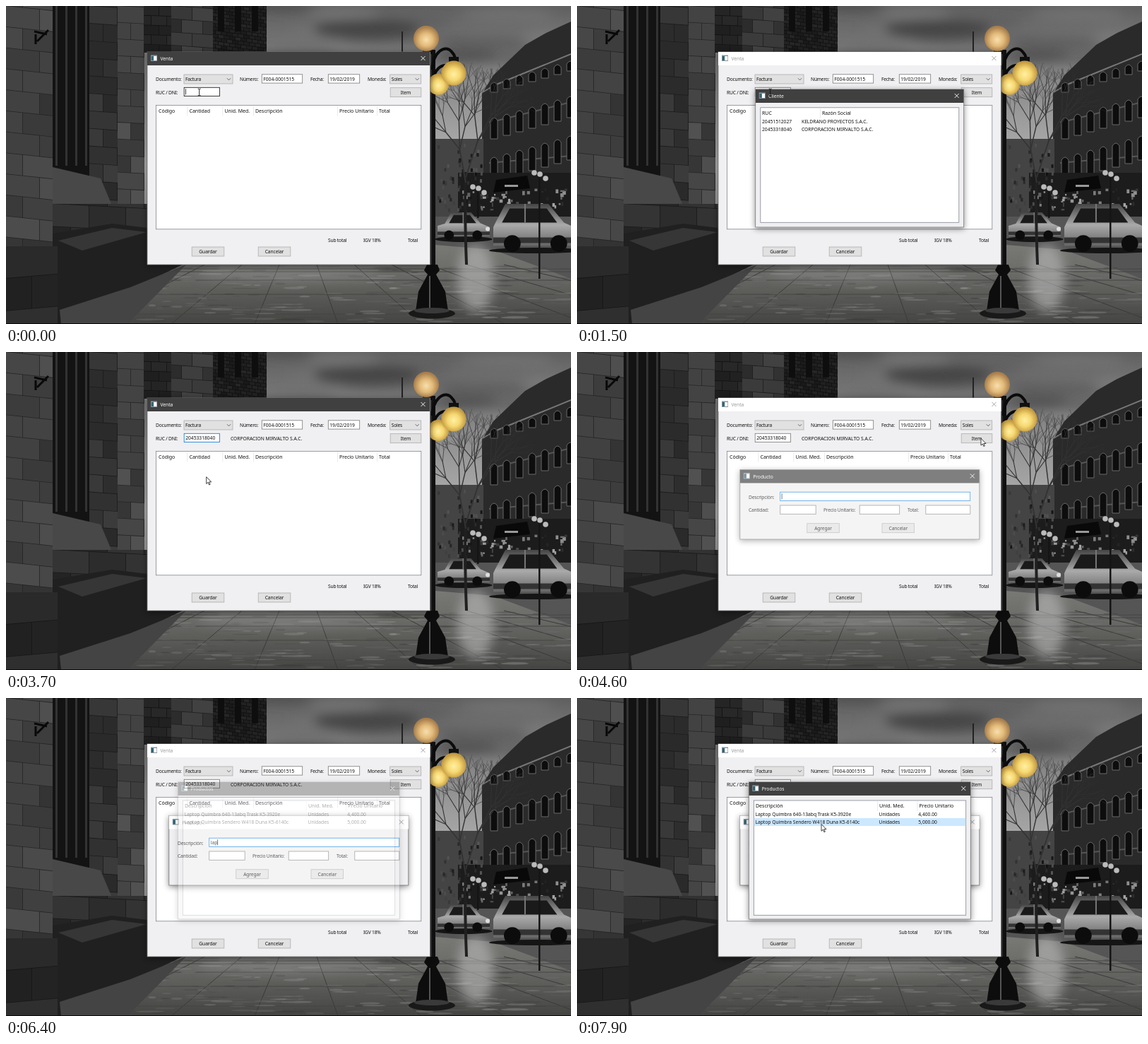
Recreate the animation shown at these times as an HTML page. Size 800 px wide and 450 px high, loop 8000 ms.

```html
<!DOCTYPE html>
<html lang="es">
<head>
<meta charset="utf-8">
<title>Venta</title>
<style>
  html, body { margin: 0; width: 100%; height: 100%; overflow: hidden; background: #222; }
  svg { display: block; }
  #stage { width: 100vw; height: 100vh; }
  text { font-family: "Noto Sans", "Open Sans", sans-serif; white-space: pre; }
  .window { filter: drop-shadow(0 2px 4px rgba(0, 0, 0, .45)); }
</style>
</head>
<body>
<svg id="stage" viewBox="0 0 800 450" preserveAspectRatio="none"></svg>
<script>
const DURATION = 8000, TICK = 100;
const stage = document.getElementById('stage');

let seed = 11;
const rnd = (lo = 0, hi = 1) => lo + (hi - lo) * (seed = (seed * 16807) % 2147483647) / 2147483647;
const grey = v => `rgb(${v | 0},${v | 0},${v | 0})`;
const repeat = (n, make) => Array.from({ length: n }, (_, i) => make(i)).join('');

// ---- drawing helpers ----
const rect = (x, y, w, h, fill, more = '') =>
  `<rect x="${x}" y="${y}" width="${w}" height="${h}" fill="${fill}" ${more}/>`;
const poly = (points, fill) => `<polygon points="${points}" fill="${fill}"/>`;
const line = (d, stroke, width = 1, fill = 'none') =>
  `<path d="${d}" fill="${fill}" stroke="${stroke}" stroke-width="${width}"/>`;
const oval = (x, y, rx, ry, fill, more = '') =>
  `<ellipse cx="${x}" cy="${y}" rx="${rx}" ry="${ry}" fill="${fill}" ${more}/>`;
const disc = (x, y, r, fill) => oval(x, y, r, r, fill);
const text = (x, y, s, { size = 6.7, gap = 0, fill = '#111', more = '' } = {}) =>
  `<text x="${x}" y="${y}" font-size="${size}" letter-spacing="${gap}" fill="${fill}" ${more}>${s}</text>`;
const label = (x, y, s) => text(x, y, s, { gap: -.2 });
const cell = (x, y, s) => text(x, y, s, { size: 7 });
const gradient = (id, colors, kind = 'linearGradient', more = 'x2="0" y2="1"') =>
  `<${kind} id="${id}" ${more}>${colors.map((c, i) =>
    `<stop offset="${i / (colors.length - 1)}" stop-color="${c}"/>`).join('')}</${kind}>`;

// ---- backdrop ----
function stones(x, y, w, h, size, tone, skew = 0) {
  const high = size * .62;
  const courses = repeat(Math.ceil(h / high) + 5, r => repeat(Math.ceil(w / size) + 1, c =>
    rect((c - r % 2 / 2) * size, (r - 4) * high, size - .8, high - .8, grey(tone * rnd(.78, 1.2)))));
  return `<svg x="${x}" y="${y}" width="${w}" height="${h}">${rect(0, 0, w, h, grey(tone * .55))}
    <g transform="skewY(${skew})">${courses}</g></svg>`;
}

function branch(x, y, angle, length, depth) {
  const x2 = x + Math.cos(angle) * length, y2 = y + Math.sin(angle) * length;
  const twig = line(`M${x.toFixed(1)} ${y.toFixed(1)}L${x2.toFixed(1)} ${y2.toFixed(1)}`, '#333', depth * .36);
  return depth < 2 ? twig : twig + repeat(3, i =>
    branch(x2, y2, angle + (i - 1) * .42 + rnd(-.18, .18), length * rnd(.62, .87), depth - 1));
}

function clouds() {
  return `<g filter="url(#soft)">${repeat(16, i =>
    oval(390 + i * 29, rnd(0, 75), rnd(35, 75), rnd(5, 11), grey(rnd(70, 135)), 'opacity=".7"'))}
    ${oval(510, 32, 75, 13, '#444')}</g>`;
}

function street() {
  const floor = (y, h) => repeat(7, i => {
    const x = 686 + i * 18;
    return line(`M${x} ${y + h - i * 5}v${-h + 4}q5 -8 10 0v${h - 4}z`, '#686868', 1, '#0d0d0d');
  });
  return poly('674,124 690,98 735,55 765,38 800,22 800,300 674,300', '#2a2a2a')
    + line('M675 122L692 112 800 68', '#777', 2) + line('M684 165L800 136M684 222L800 212', '#555', 2)
    + floor(108, 14) + floor(158, 30) + floor(214, 34)
    + rect(608, 188, 68, 110, '#444') + rect(640, 236, 160, 64, '#1c1c1c')
    + repeat(60, () => rect(rnd(610, 672), rnd(194, 290), 3, 5, grey(rnd(15, 90))))
    + repeat(60, () => rect(rnd(645, 796), rnd(258, 290), rnd(2, 6), rnd(2, 6), grey(rnd(35, 170))))
    + poly('694,246 738,240 742,258 690,264', '#090909') + rect(706, 253, 19, 3, '#999');
}

function car(x, y, w, h, cabin) {
  const px = k => x + w * k, py = k => y + h * k;
  return oval(px(.5), py(1), w * .55, 4, '#151515')
    + `<path d="M${x} ${py(.9)}V${py(.5)}L${px(cabin - .12)} ${py(.42)} ${px(cabin)} ${y}H${px(.64)}L${px(.82)} ${py(.4)} ${px(1)} ${py(.55)}V${py(.9)}z" fill="url(#paint)"/>`
    + poly(`${px(cabin - .04)},${py(.4)} ${px(cabin + .05)},${py(.1)} ${px(.62)},${py(.1)} ${px(.74)},${py(.4)}`, '#1a1a1a')
    + rect(px(cabin + .22), y, 2, h * .4, '#777') + rect(x, py(.72), w, h * .12, '#333')
    + disc(px(.22), py(.85), h * .18, '#0c0c0c') + disc(px(.76), py(.85), h * .18, '#0c0c0c')
    + disc(px(.96), py(.62), 3, '#ddd');
}

function pavement() {
  return poly('0,366 800,300 800,450 0,450', 'url(#ground)')
    + poly('608,298 800,298 800,386 690,345 608,338', '#555')
    + repeat(11, i => line(`M${175 + i * 53} 366L${-120 + i * 118} 450`, '#3a3a3a'))
    + repeat(5, i => line(`M100 ${372 + i * i * 4}H800`, '#444'))
    + repeat(240, () => {
      const y = rnd(368, 448);
      return oval(rnd(190, 800), y, rnd(5, 22), rnd(.5, 1.8), grey(rnd(50, 165)), 'opacity=".35"');
    })
    + `<g filter="url(#soft)">${oval(665, 385, 26, 48, '#bbb', 'opacity=".6"')}${oval(400, 380, 130, 9, '#aaa', 'opacity=".35"')}</g>`;
}

function church() {
  const bars = repeat(4, i => rect(70 + i * 14, 0, 3, 226, '#333'));
  return stones(0, 0, 68, 345, 48, 66, 6) + rect(66, 0, 54, 262, '#131313') + bars
    + stones(118, 0, 41, 312, 40, 50, 4) + stones(158, 0, 38, 312, 38, 68, 3)
    + stones(195, 0, 40, 66, 22, 36, 2) + stones(234, 0, 60, 66, 30, 56, 4) + stones(293, 0, 76, 66, 8, 32, 8)
    + repeat(3, i => rect(300 + i * 24, 0, 9, 36, '#0e0e0e'))
    + poly('66,228 134,244 150,282 66,282', '#484848') + stones(66, 280, 134, 50, 52, 46, 3)
    + poly('66,322 150,308 200,314 250,366 172,404 78,450 66,450', '#202020')
    + poly('74,332 150,314 199,320 108,346', '#363636') + poly('78,450 76,430 176,398 255,366 172,450', '#444')
    + stones(0, 340, 73, 110, 74, 40, -5) + line('M40 36L58 40M44 50L60 34M42 40V54', '#090909', 3);
}

function streetLamp() {
  return rect(600, 62, 8, 310, '#111') + rect(601, 62, 2, 310, '#333')
    + line('M604 90C604 66 622 52 632 66Q638 72 634 80M606 98Q612 84 622 84', '#0b0b0b', 4)
    + rect(590, 62, 13, 6, '#111') + rect(627, 72, 14, 7, '#101010') + rect(560, 36, 2, 30, '#222')
    + disc(612, 111, 15, 'url(#glow)') + disc(634, 95, 17.5, 'url(#glow)') + disc(595, 46, 18, 'url(#dusk)')
    + poly('596,366 611,366 614,374 609,380 622,404 626,432 580,432 584,404 597,380 592,374', '#0d0d0d')
    + oval(603, 435, 33, 7.5, '#191919') + oval(603, 431, 25, 4, '#3a3a3a') + rect(599, 382, 2, 45, '#555');
}

const smallLamp = (x, y, h) => rect(x - 1, y, 2.5, h, '#151515')
  + repeat(3, i => disc(x - 7 + i * 8, y + i * i * 2, 3.8, '#bbb'));

const round = 'radialGradient', centre = 'cy=".55"';
const backdrop = `<defs>
    ${gradient('sky', ['#606060', '#7c7c7c', '#999', '#b0b0b0', '#999'])}
    ${gradient('ground', ['#858582', '#6c6c69', '#444442'])}
    ${gradient('paint', ['#444', '#aaa', '#666'])}
    ${gradient('glow', ['#fff0a4', '#f6d872', '#c39a40'], round, centre)}
    ${gradient('dusk', ['#f8dfad', '#e3bb7b', '#a97f4c'], round, centre)}
    <filter id="soft" x="-50%" y="-80%" width="200%" height="260%"><feGaussianBlur stdDeviation="8"/></filter></defs>`
  + rect(0, 0, 800, 300, 'url(#sky)') + clouds() + street() + pavement() + church()
  + car(611, 292, 74, 38, .26) + car(690, 280, 122, 66, .14)
  + line('M652 366Q649 290 651 235', '#202020', 4) + branch(651, 250, -1.75, 48, 5) + branch(651, 242, -1.25, 54, 5)
  + smallLamp(755, 236, 150) + smallLamp(668, 256, 44) + streetLamp() + rect(0, 449, 800, 1, '#0c0c0c');

// ---- widgets ----
const box = (x, y, w, h, fill, stroke, more = '') => rect(x, y, w, h, fill, `stroke="${stroke}" stroke-width=".8" ${more}`);
const field = (x, y, w, s = '', id = '') => box(x, y, w, 12.3, '#fff', '#7a7a7a', id && `id="${id}Box"`)
  + text(x + 2, y + 9, s, { more: id && `id="${id}"` })
  + (id && rect(x + 2, y + 2, .8, 8.2, '#111', `id="${id}Caret"`));
const button = (x, y, w, s, more = '') => box(x, y, w, 13, '#e1e1e1', '#adadad', more)
  + text(x + w / 2, y + 9, s, { gap: -.1, more: 'text-anchor="middle"' });
const combo = (x, w, s) => box(x, 97, w, 13, '#e1e1e1', '#adadad') + label(x + 2, 106, s)
  + line(`M${x + w - 8} 102.3l2.5 2.5 2.5-2.5`, '#444', .8);

function table(x, y, w, h, headers, id = '', rows = []) {
  const titles = Object.entries(headers).map(([title, left], i) =>
    cell(left, y + 10.3, title) + (i ? rect(left - 3, y + 1, .7, 14, '#e2e2e2') : '')).join('');
  const lines = rows.map((cells, r) => rect(x + .5, y + 14 + r * 11, w - 1, 11, '#e5f3fb', `id="${id}Row${r}"`)
    + cells.map(([left, s]) => text(left, y + 22.3 + r * 11, s)).join('')).join('');
  return box(x, y, w, h, '#fff', '#828790') + lines + titles;
}

function frame(id, x, y, w, h, title, content) {
  const bar = (ink, fill) => rect(x, y, w, 19, fill) + text(x + 18.4, y + 12, title, { fill: ink })
    + rect(x + 5, y + 4.5, 9, 8.5, '#8c979c') + rect(x + 5.8, y + 6, 3, 6, '#2e6378') + rect(x + 9.3, y + 6, 4, 6, '#fff');
  const cross = ink => line(`M${x + w - 13} ${y + 6}l6 6m0-6l-6 6`, ink, .9);
  return `<g id="${id}" class="window">${box(x, y, w, h, '#f0eff1', '#777')}${bar('#999', '#fff')}${cross('#999')}
    <g id="${id}Bar">${bar('#fff', '#404040')}${rect(x + w - 20, y, 20, 19, '#e81123', `id="${id}Close" opacity="0"`)}
    ${cross('#fff')}</g>${content}</g>`;
}

const RUC = '20453318040', CLIENT = 'CORPORACION MIRVALTO S.A.C.';

const sale = frame('sale', 200, 65, 400.5, 301, 'Venta',
  label(212, 106, 'Documento:') + combo(252, 69, 'Factura')
  + label(331, 106, 'Número:') + field(362.3, 96.8, 57.4, 'F004-0001515')
  + label(431, 106, 'Fecha:') + field(456.3, 96.8, 44.4, '19/02/2019')
  + label(512, 106, 'Moneda:') + combo(543.7, 44, 'Soles')
  + label(212, 124.5, 'RUC / DNI:') + field(252.2, 115.3, 50.2, '', 'ruc')
  + text(318, 124.5, CLIENT, { more: 'id="client"' }) + button(544.2, 115.7, 43.6, 'Item', 'id="item"')
  + table(212.5, 140.5, 375.3, 175.3, { 'Código': 216, 'Cantidad': 259.5, 'Unid. Med.': 309.5,
    'Descripción': 353, 'Precio Unitario': 472, 'Total': 528 })
  + label(456, 334, 'Sub total') + label(506, 334, 'IGV 18%') + label(569, 334, 'Total')
  + button(263.2, 341, 45.6, 'Guardar') + button(357.2, 341, 45.6, 'Cancelar'));

const clients = frame('clients', 252.7, 118, 295, 195, 'Cliente',
  table(259.8, 143.8, 281, 162.5, { 'RUC': 262, 'Razón Social': 347 }, 'clients',
    [[[262, '20451512027'], [318, 'KELDRANO PROYECTOS S.A.C.']], [[262, RUC], [318, CLIENT]]]));

const product = frame('product', 230.8, 166.5, 339, 98.5, 'Producto',
  label(243, 207.5, 'Descripción:') + field(287.7, 198.2, 269, '', 'search')
  + label(243, 226, 'Cantidad:') + field(287.7, 217, 50.5)
  + label(349, 226, 'Precio Unitario:') + field(400.2, 217, 56.5)
  + label(468, 226, 'Total:') + field(493.8, 217, 63)
  + button(325.7, 242.7, 45.6, 'Agregar') + button(432, 242.7, 45.6, 'Cancelar'));

const item = (name, price) => [[252.5, name], [427.5, 'Unidades'], [483.3, price]];
const catalog = frame('catalog', 243.3, 119, 314, 194, 'Productos',
  table(250.3, 145, 300.4, 162.3, { 'Descripción': 253, 'Unid. Med.': 428, 'Precio Unitario': 484.5 }, 'catalog',
    [item('Laptop Quimbra 640-13abq Trask K5-3920e', '4,400.00'),
      item('Laptop Quimbra Sendero W418 Duna K5-6140c', '5,000.00')]));

stage.innerHTML = backdrop + sale + clients + product + catalog
  + line('M0 0V9.8L2.3 7.7 3.9 11.3 5.4 10.6 3.8 7.2H7z', '#111', .8, '#fff').replace('<path', '<path id="arrow"')
  + line('M-2-4.8H-.6L0-4.2 .6-4.8H2M0-4.2V4.2M-2 4.8H-.6L0 4.2 .6 4.8H2', '#111', .9).replace('<path', '<path id="beam"');

// ---- motion ----
const $ = id => document.getElementById(id);
const clamp = v => Math.min(1, Math.max(0, v));
const show = (id, amount) => $(id).setAttribute('opacity', Number(amount));
const paint = (id, name, color) => $(id).setAttribute(name, color);
const place = (id, [x, y]) => $(id).setAttribute('transform', `translate(${x} ${y})`);

const DIGIT = 3.83;
function write(id, s, caretOn) {
  $(id).textContent = s;
  const width = id === 'ruc' ? s.length * DIGIT : $(id).getComputedTextLength();
  place(id + 'Caret', [width, 0]);
  show(id + 'Caret', caretOn);
}

// Each leg eases on to its end point between two times.
const glide = (t, start, ...legs) => legs.reduce(([x, y], [from, to, x2, y2]) => {
  const k = clamp((t - from) / (to - from)), e = k * k * (3 - 2 * k);
  return [x + (x2 - x) * e, y + (y2 - y) * e];
}, start);

function hit(id, [x, y]) {
  const b = $(id).getBBox();
  return x >= b.x && x < b.x + b.width && y >= b.y && y < b.y + b.height;
}

function render(t) {
  const during = (from, to = DURATION) => t >= from && t < to;
  const fade = (open, close = Infinity) => clamp((t - open + TICK) / 300) * clamp(1 - (t - close + TICK) / 300);
  const typed = (s, start, pace) => s.slice(0, Math.max(0, Math.floor((t - start) / pace) + 1));

  show('clients', fade(1300, 3000));
  show('product', fade(4500));
  show('catalog', fade(6400));
  show('saleBar', during(0, 1300) || during(3200, 4500));
  show('productBar', during(0, 6400));

  write('ruc', t < 3500 ? typed(RUC.slice(0, 4), 300, 200) : RUC, during(0, 1300));
  write('search', typed('lap', 5900, 100), !during(5200, 5700));
  show('client', during(3500));
  paint('rucBox', 'stroke', during(0, 1300) ? '#111' : during(3200, 4500) ? '#0078d7' : '#7a7a7a');
  paint('searchBox', 'stroke', '#0078d7');

  const arrow = glide(t, [273.5, 122], [2000, 2700, 283.7, 176.7], [3700, 4300, 572, 122.3],
    [5200, 6700, 549, 204], [6700, 6900, 539, 137.3], [7100, 7800, 346, 178.5]);
  place('arrow', arrow);
  show('arrow', during(2100, 5200) || during(6800));
  place('beam', t < 5200 ? [273.7, 122] : [549, 204]);
  show('beam', during(0, 2100) || during(5200, 5900));

  for (const [list, pick] of [['clients', 2900], ['catalog', 7900]]) {
    for (const r of [0, 1]) {
      show(`${list}Row${r}`, hit(`${list}Row${r}`, arrow));
      paint(`${list}Row${r}`, 'fill', t < pick ? '#e5f3fb' : '#cce8ff');
    }
  }
  show('catalogClose', hit('catalogClose', arrow));
  const hot = during(3700, 4500) && hit('item', arrow);
  paint('item', 'fill', !hot ? '#e1e1e1' : t < 4400 ? '#e5f1fb' : '#cce4f7');
  paint('item', 'stroke', hot ? '#0078d7' : '#adadad');
}

function loop() {
  render(Math.floor(performance.now() % DURATION / TICK) * TICK);
  requestAnimationFrame(loop);
}
loop();
</script>
</body>
</html>
```
